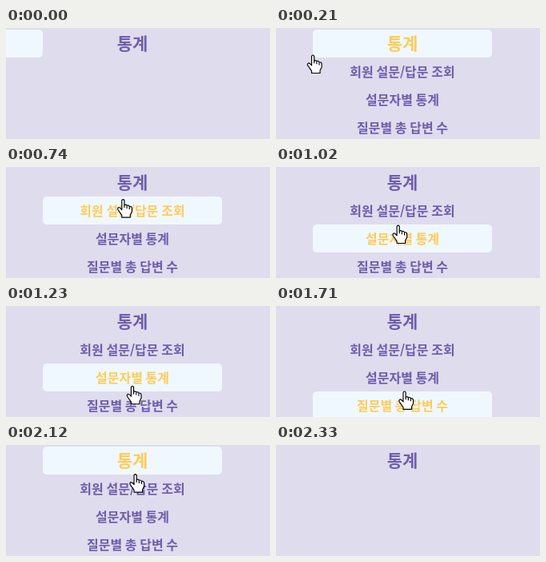
An HTML page with a canvas for the animation above (3.12 s loop, 330 px wide and 139 px high).

```html
<!DOCTYPE html>
<html lang="ko">
<head>
<meta charset="utf-8">
<style>
html, body { margin: 0; width: 100%; height: 100%; overflow: hidden; background: #dfdcee; }
canvas { display: block; }
</style>
</head>
<body>
<canvas id="stage" width="330" height="139"></canvas>
<script>
const ctx = document.getElementById('stage').getContext('2d');
const LOOP = 3120;
const STEP = 68.75;
const FIRST_STEP = 130;
const ROW = { top: 2, height: 35, left: 46, width: 224 };
const COLORS = { page: '#dfdcee', hover: '#f0f8ff', text: '#6f5eaa', active: '#fecb58' };
const LABELS = ['통계', '회원 설문/답문 조회', '설문자별 통계', '질문별 총 답변 수'];

// The pointer enters from the left, moves down the menu, then leaves upwards
const MOVES = [
  { start: 62, end: 540, from: [-8, 33], to: [146, 36.3], ease: u => 1 - (1 - u) ** 1.3 },
  { start: 630, end: 1440, from: [146, 36.3], to: [161, 113.3], ease: u => u * u * (3 - 2 * u) },
  { start: 1590, end: 2330, from: [161, 113.3], to: [163, -20], ease: u => u ** 1.7 }
];

const hand = new Path2D(
  'M-1.5 1.5 Q0 -0.8 1.5 1.5 V7 Q3.3 5.8 4.5 7.6 Q6.3 6.6 7.5 8.6 ' +
  'Q10.5 8.2 10.5 11 V14.5 L8.5 18.5 V21.5 H-1.5 V19 L-5.8 13 ' +
  'Q-7.3 10.6 -5.2 9.7 Q-4 9.4 -1.5 12.5 Z');

function pointerAt(time) {
  const move = MOVES.findLast(m => m.start <= time) || MOVES[0];
  const u = (time - move.start) / (move.end - move.start);
  const k = move.ease(Math.min(1, Math.max(0, u)));
  return move.from.map((a, i) => a + (move.to[i] - a) * k);
}

function box(x, y, width) {
  ctx.fillStyle = COLORS.hover;
  ctx.beginPath();
  ctx.roundRect(x, y, width, ROW.height, 5);
  ctx.fill();
}

function label(index, active) {
  const size = index ? 16 : 21;
  const baseline = ROW.top + index * ROW.height + (index ? 24 : 25);
  ctx.font = `700 ${size}px "Noto Sans CJK KR", "Noto Sans CJK", sans-serif`;
  ctx.fillStyle = active ? COLORS.active : COLORS.text;
  ctx.fillText(LABELS[index], 158, baseline);
}

function pointer(x, y) {
  ctx.save();
  ctx.translate(x - 0.5, y - 0.5);
  ctx.scale(1.05, 1.06);
  ctx.fillStyle = '#fff';
  ctx.fill(hand);
  ctx.strokeStyle = '#000';
  ctx.lineWidth = 1.1;
  ctx.lineJoin = 'round';
  ctx.stroke(hand);
  ctx.beginPath();
  for (let finger = 0; finger < 3; finger++) {
    ctx.moveTo(1.5 + 3 * finger, 7 + finger);
    ctx.lineTo(1.5 + 3 * finger, 10 + finger);
  }
  ctx.stroke();
  ctx.restore();
}

function draw(time) {
  // The picture is refreshed in even steps
  const step = Math.floor((time - FIRST_STEP + 10) / STEP);
  const [x, y] = pointerAt(FIRST_STEP + step * STEP);
  const open = x >= ROW.left && y >= 0;
  const hovered = open ? Math.max(0, Math.floor((y - ROW.top) / ROW.height)) : -1;

  ctx.fillStyle = COLORS.page;
  ctx.fillRect(0, 0, 330, 139);
  if (x < ROW.left) box(ROW.left - ROW.width, ROW.top, ROW.width);
  if (open) box(ROW.left, ROW.top + hovered * ROW.height, ROW.width);

  ctx.textAlign = 'center';
  LABELS.forEach((_, i) => { if (open || i === 0) label(i, i === hovered); });
  if (x >= 0 && y >= 0) pointer(x, y);
}

function tick() {
  draw(performance.now() % LOOP);
  requestAnimationFrame(tick);
}
tick();
</script>
</body>
</html>
```
